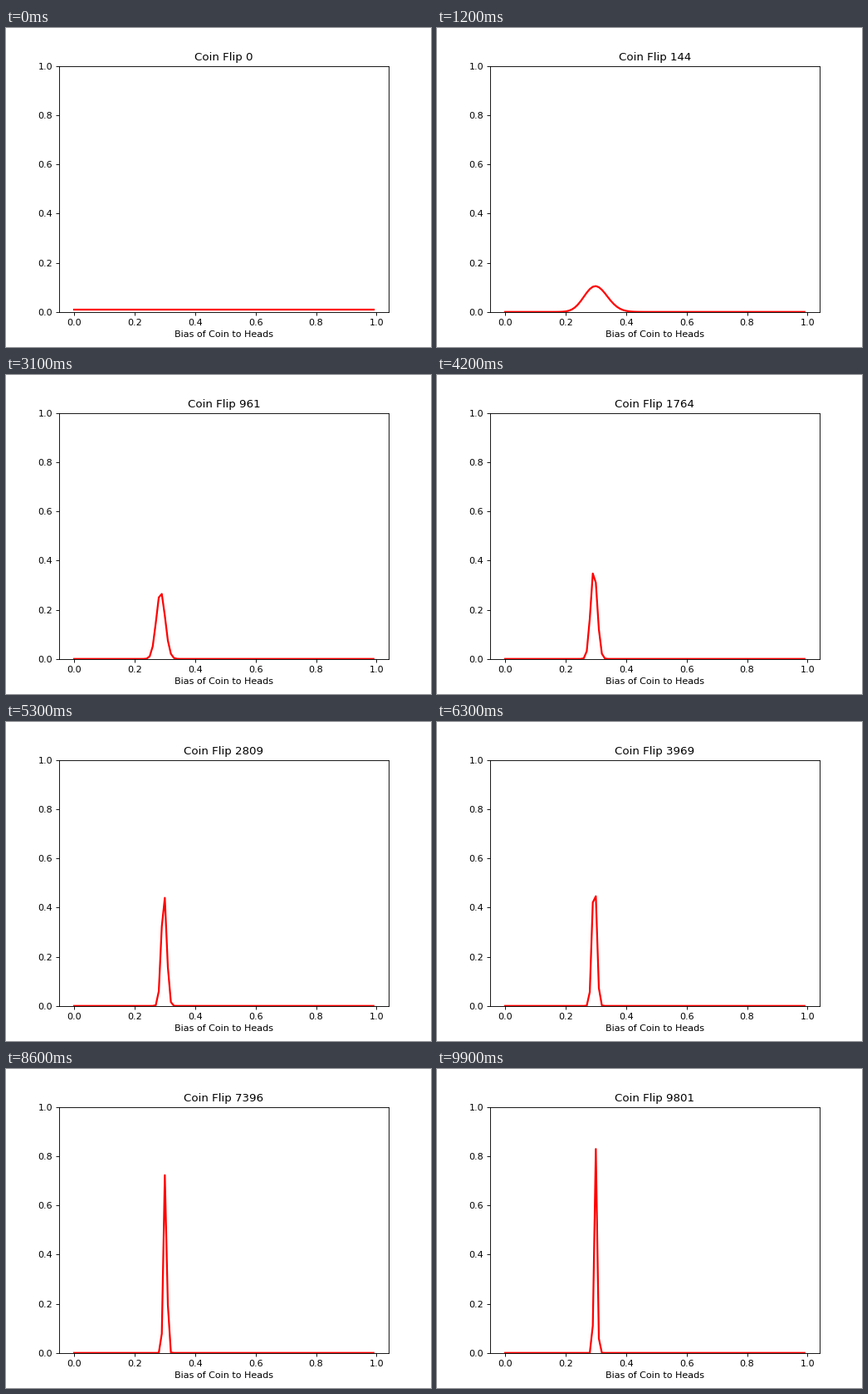
Animation of 512 by 384 pixels, one loop 10 s. Source, as a matplotlib script:

```python
import numpy as np
import matplotlib.pyplot as plt
from matplotlib.animation import FuncAnimation

FRAMES = 100
INTERVAL = 100  # ms

# Running head count after a given number of flips
FLIPS = [0, 144, 961, 2809, 5329, 7396, 9801]
HEADS = [0, 43, 275, 835, 1568, 2228, 2933]

bias = np.arange(100) / 100
log_heads = np.log(np.maximum(bias, 1e-300))
log_tails = np.log(1 - bias)


def posterior(flips):
    """Normalised belief about the bias, starting from a flat prior."""
    heads = round(np.interp(flips, FLIPS, HEADS))
    log_like = heads * log_heads + (flips - heads) * log_tails
    like = np.exp(log_like - log_like.max())
    return like / like.sum()


plt.rcParams["font.family"] = "DejaVu Sans"
fig, ax = plt.subplots(figsize=(6.4, 4.8), dpi=80)
line, = ax.plot(bias, posterior(0), color="red", lw=2)
ax.set_xlim(-0.0495, 1.0395)
ax.set_ylim(0, 1)
ax.set_xlabel("Bias of Coin to Heads")
title = ax.set_title("Coin Flip 0")


def update(i):
    flips = i ** 2
    line.set_ydata(posterior(flips))
    title.set_text(f"Coin Flip {flips}")
    return line, title


anim = FuncAnimation(fig, update, frames=FRAMES, interval=INTERVAL,
                     repeat=True, repeat_delay=0)
plt.show()
```
